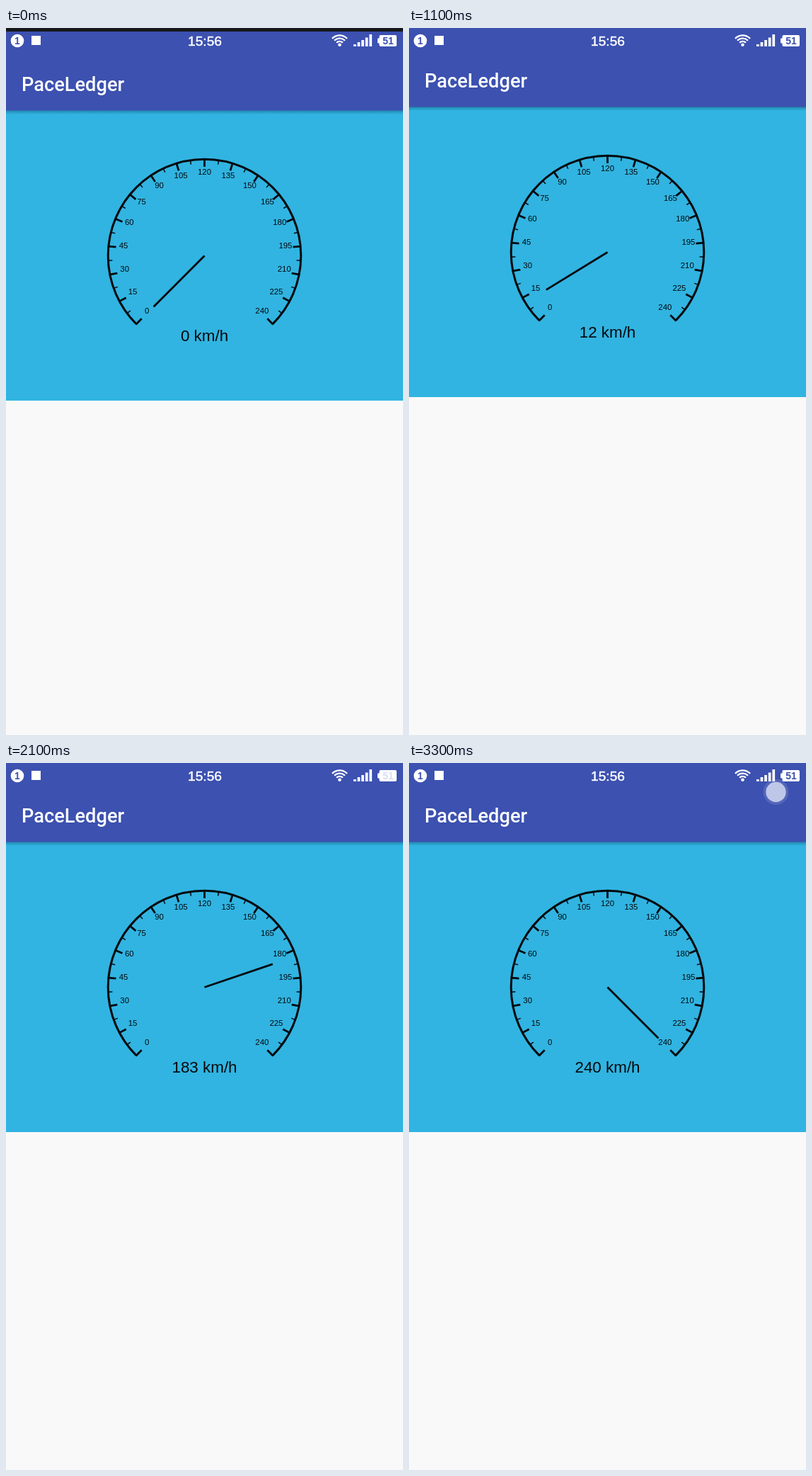
Recreate the animation shown at these times as an HTML page with a canvas. Size 561x998 px, loop 3.4 s.

```html
<!DOCTYPE html>
<html lang="en">
<head>
<meta charset="utf-8">
<title>Speedometer</title>
<style>
html, body { margin: 0; width: 100%; height: 100%; overflow: hidden; background: #f9f9f9; }
canvas { display: block; }
</style>
</head>
<body>
<canvas id="stage" width="561" height="998"></canvas>
<script>
const ctx = document.getElementById('stage').getContext('2d');
const LOOP = 3400, STEP = 100;
const HEADER = '#3c51b0', WHITE = '#fff', BLACK = '#05080c';
const SANS = '"Liberation Sans", Arial, sans-serif';
const CX = 280.5, CY = 316.5, RADIUS = 136.3, MAX = 240;

// [time, value] pairs: progress of the sweep and opacity of the battery text
const SWEEP = [[830, 0], [1100, .1436], [1900, .5614], [2400, .8506], [2680, 1]];
const CHARGE = [[1500, 1], [1900, 0], [2000, 0], [2400, .75], [2600, 1]];

function track(keys, t) {
  if (t <= keys[0][0]) return keys[0][1];
  for (let i = 1; i < keys.length; i++) {
    const [t0, v0] = keys[i - 1], [t1, v1] = keys[i];
    if (t <= t1) return v0 + (v1 - v0) * (t - t0) / (t1 - t0);
  }
  return keys[keys.length - 1][1];
}

function rect(x, y, w, h, color) {
  ctx.fillStyle = color;
  ctx.fillRect(x, y, w, h);
}

function roundRect(x, y, w, h, r, color) {
  ctx.fillStyle = color;
  ctx.beginPath();
  ctx.roundRect(x, y, w, h, r);
  ctx.fill();
}

function disc(x, y, r, color) {
  ctx.fillStyle = color;
  ctx.beginPath();
  ctx.arc(x, y, r, 0, Math.PI * 2);
  ctx.fill();
}

function arc(x, y, r, from, to, width, color) {
  ctx.strokeStyle = color;
  ctx.lineWidth = width;
  ctx.beginPath();
  ctx.arc(x, y, r, from, to);
  ctx.stroke();
}

function text(str, x, y, font, color, align = 'center') {
  ctx.font = font;
  ctx.fillStyle = color;
  ctx.textAlign = align;
  ctx.fillText(str, x, y);
}

const angleOf = speed => (135 + speed / MAX * 270) * Math.PI / 180;
const polar = (r, a) => [CX + r * Math.cos(a), CY + r * Math.sin(a)];

function spoke(r0, r1, a, width) {
  ctx.strokeStyle = BLACK;
  ctx.lineWidth = width;
  ctx.beginPath();
  ctx.moveTo(...polar(r0, a));
  ctx.lineTo(...polar(r1, a));
  ctx.stroke();
}

function drawStatusBar(charge) {
  disc(16, 18, 9.3, WHITE);
  text('1', 16, 23, 'bold 14px ' + SANS, HEADER);
  rect(36, 11, 13, 13, WHITE);

  text('15:56', 281, 25, '19.2px ' + SANS, WHITE);
  ctx.strokeStyle = WHITE;
  ctx.lineWidth = .5;
  ctx.strokeText('15:56', 281, 25);

  for (const r of [6, 10.2, 14.5])
    arc(471.5, 24.8, r, -Math.PI * .76, -Math.PI * .24, 2.2, WHITE);
  disc(471.5, 23.8, 2.3, WHITE);

  [3, 6, 9, 12.5, 17].forEach((h, i) => rect(491 + i * 5.6, 26 - h, 3.7, h, WHITE));

  roundRect(525, 14.5, 4, 7, 1, WHITE);
  roundRect(527.5, 10, 24.5, 16, 2, WHITE);
  ctx.globalAlpha = charge;
  text('51', 540, 23, 'bold 14px ' + SANS, HEADER);
  ctx.globalAlpha = 1;
}

function drawHeader() {
  const shadow = ctx.createLinearGradient(0, 111, 0, 117);
  shadow.addColorStop(0, 'rgba(0,30,60,.32)');
  shadow.addColorStop(1, 'rgba(0,30,60,0)');
  rect(0, 111, 561, 6, shadow);
  rect(0, 0, 561, 111.5, HEADER);
  text('PaceLedger', 22, 84, '500 27.2px Roboto, sans-serif', WHITE, 'left');
}

function drawGauge(speed) {
  arc(CX, CY, RADIUS, angleOf(0), angleOf(MAX), 3, BLACK);
  for (let v = 0; v <= MAX; v += 7.5) {
    const a = angleOf(v), major = v % 15 === 0;
    spoke(RADIUS + (major ? .8 : 0), RADIUS - (major ? 10.7 : 6), a, major ? 2.8 : 1.5);
    if (major) {
      const [x, y] = polar(115, a);
      text(v, x, y + .3, '11.4px ' + SANS, BLACK);
    }
  }
  spoke(0, 101.7, angleOf(speed), 2.8);
  text(Math.round(speed) + ' km/h', CX, 437, '22.4px ' + SANS, BLACK);
}

function drawTouch() {
  disc(518.5, 41, 18, 'rgba(255,255,255,.12)');
  disc(518.5, 41, 14.2, 'rgba(225,232,245,.75)');
}

function draw(t) {
  const speed = MAX * (1 - Math.cos(Math.PI * track(SWEEP, t))) / 2;
  const opening = t < STEP;
  rect(0, 0, 561, 998, '#f9f9f9');

  // The app starts slightly lower, while the status bar stays in place
  ctx.save();
  if (opening) ctx.translate(0, 5);
  rect(0, 111, 561, 410, '#31b4e1');
  drawHeader();
  drawGauge(speed);
  ctx.restore();

  if (opening) rect(0, 0, 561, 5, '#17181c');
  drawStatusBar(track(CHARGE, t));
  if (t >= 3200) drawTouch();
}

const start = performance.now();
function frame() {
  const t = (performance.now() - start) % LOOP;
  draw(Math.floor(t / STEP) * STEP);
  requestAnimationFrame(frame);
}
frame();
</script>
</body>
</html>
```
